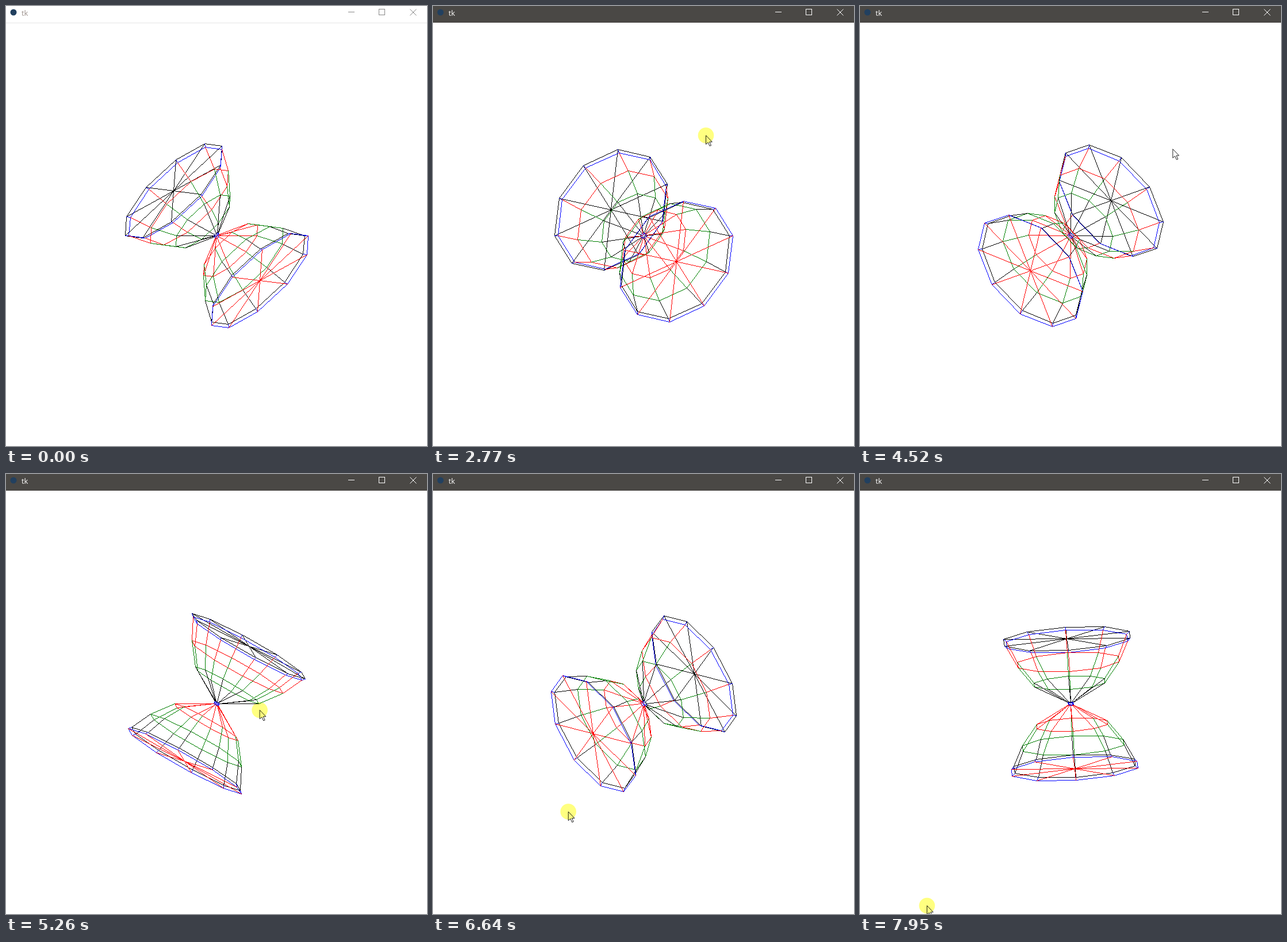
Recreate the animation shown at these times as an HTML page with a canvas. Size 732x765 px, loop 8 s.

```html
<!DOCTYPE html>
<html lang="en">
<head>
<meta charset="utf-8">
<title>tk</title>
<style>
  html, body { margin: 0; width: 100%; height: 100%; overflow: hidden; background: #fff; }
  #stage { position: relative; width: 732px; height: 765px; overflow: hidden; }
  canvas, #bar svg { position: absolute; left: 0; top: 0; }
  #bar {
    position: absolute; left: 0; top: 0; width: 732px; height: 29px;
    background: #fff; color: #9c918c; border-bottom: 1px solid #e5e5e5;
    font: 13px/24px "Open Sans", "Noto Sans", sans-serif;
  }
  #bar span { position: absolute; left: 27px; top: 0; }
  #bar svg { stroke: #888; fill: none; }
  #bar.active { background: #4a4845; color: #fff; border-color: #fff; }
  #bar.active svg { stroke: #fff; }
</style>
</head>
<body>
<div id="stage">
  <canvas id="view" width="732" height="765"></canvas>
  <div id="bar">
    <svg width="732" height="28">
      <circle cx="13" cy="11" r="5.5" fill="#22405f" stroke="none"/>
      <path d="M595 10.5h11M648.5 5.5h10v10h-10z" shape-rendering="crispEdges"/>
      <path d="M702.5 5.5l11 11M713.5 5.5l-11 11"/>
    </svg>
    <span>tk</span>
  </div>
</div>
<script>
const LOOP = 8000, CX = 366, CY = 399, SIDES = 10;
const COLORS = ['#000', '#00f', '#f00', '#008000'];

// half of the lathe profile as [height, radius]; the other half is mirrored
const HALF = [[115, 0], [115, 115], [110.4, 110.4], [73.6, 92.4], [36.8, 64.5], [2.5, 4.6]];
const PROFILE = HALF.concat(HALF.map(([h, r]) => [-h, r]).reverse());

// each drag turns the solid to a new pose (degrees); lift arcs the elevation on the way
const DRAGS = [
  { from: 0, to: 0, pose: [-62.5, 42.7, -14], lift: 0 },
  { from: 980, to: 1520, pose: [-94, 46.2, -5], lift: 0 },
  { from: 1520, to: 2770, pose: [-32.6, 23, -6.9], lift: 0 },
  { from: 2910, to: 3950, pose: [45.9, 32, 4], lift: -14 },
  { from: 4720, to: 5950, pose: [119, 31.4, -10.7], lift: 29 },
  { from: 5950, to: 7260, pose: [4.9, 23, -6.8], lift: 0 },
  { from: 7260, to: 7950, pose: [-18.5, 79.2, -19.5], lift: 0 }
];

// pointer stops: time, x, y
const STOPS = [
  [120, 745, 722], [1520, 435, 322], [2770, 474.5, 225], [3700, 518, 214],
  [4150, 587, 225], [4520, 544, 248.5], [5950, 345.5, 561],
  [7260, 136.5, 610.5], [7950, 116.5, 750.5]
];

const canvas = document.getElementById('view');
const bar = document.getElementById('bar');
const ctx = canvas.getContext('2d');
const arrow = new Path2D('M0 0V15.5L3.7 12.2L6.5 18.4L9 17.4L6.2 11.3H10.8Z');

const rad = d => d * Math.PI / 180;
const mix = (a, b, f) => a.map((v, i) => v + (b[i] - v) * f);
const progress = (t, from, to) => Math.min(1, Math.max(0, (t - from) / (to - from)));

function poseAt(t) {
  let pose = DRAGS[0].pose;
  for (const d of DRAGS.slice(1)) {
    const f = progress(t, d.from, d.to);
    pose = mix(pose, d.pose, f);
    pose[1] += d.lift * Math.sin(Math.PI * f);
  }
  return pose.map(rad);
}

function pointerAt(t) {
  return STOPS.reduce((p, stop, i) =>
    mix(p, stop, progress(t, STOPS[i - 1][0], stop[0]))).slice(1);
}

// one-pixel line without smoothing
function line([x, y], [x1, y1]) {
  const dx = Math.abs(x1 - x), dy = -Math.abs(y1 - y);
  const sx = x < x1 ? 1 : -1, sy = y < y1 ? 1 : -1;
  let err = dx + dy;
  for (;;) {
    ctx.fillRect(x, y, 1, 1);
    if (x === x1 && y === y1) return;
    const e = 2 * err;
    if (e >= dy) { err += dy; x += sx; }
    if (e <= dx) { err += dx; y += sy; }
  }
}

function drawSolid(t) {
  const [az, el, spin] = poseAt(t);
  const axis = [Math.cos(el) * Math.sin(az), -Math.sin(el)];
  const up = [-Math.sin(el) * Math.sin(az), -Math.cos(el)];
  const side = [Math.cos(az), 0];
  const rings = PROFILE.map(([h, r]) => Array.from({ length: SIDES }, (_, i) => {
    const a = spin + i * 2 * Math.PI / SIDES;
    const c = r * Math.cos(a), s = r * Math.sin(a);
    return [CX, CY].map((o, n) => Math.round(o + h * axis[n] + c * up[n] + s * side[n]));
  }));
  for (let k = 1; k < rings.length; k++) {
    ctx.fillStyle = COLORS[(k - 1) % COLORS.length];
    rings[k].forEach((p, i) => {
      line(rings[k - 1][i], p);
      line(p, rings[k][(i + 1) % SIDES]);
    });
  }
}

function drawPointer(t) {
  const pressed = t >= 900 && t < 3800 || t >= 4740;
  ctx.save();
  ctx.translate(...pointerAt(t));
  ctx.fillStyle = '#fff';
  ctx.strokeStyle = '#222';
  ctx.fill(arrow);
  ctx.stroke(arrow);
  if (pressed) {
    ctx.globalCompositeOperation = 'multiply';
    ctx.fillStyle = '#ffff80';
    ctx.beginPath();
    ctx.arc(0, 0, 13.8, 0, 2 * Math.PI);
    ctx.fill();
  }
  ctx.restore();
}

function frame(now) {
  const t = Math.max(0, now) % LOOP;
  ctx.fillStyle = '#fff';
  ctx.fillRect(0, 0, canvas.width, canvas.height);
  drawSolid(t);
  drawPointer(t);
  bar.classList.toggle('active', t >= 840);
  requestAnimationFrame(frame);
}

requestAnimationFrame(frame);
</script>
</body>
</html>
```
